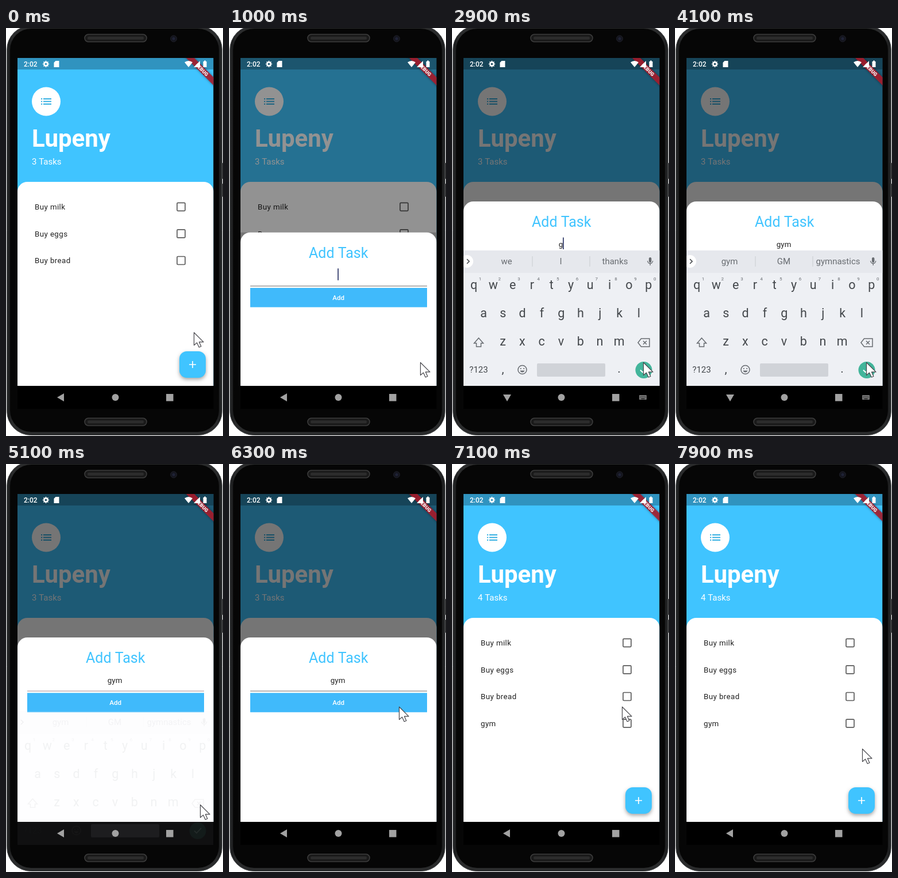
An HTML page with a canvas for the animation above (8 s loop, 378x708 px).

```html
<!DOCTYPE html>
<html lang="en">
<head>
<meta charset="utf-8">
<title>Adding a task</title>
<style>
html, body { margin: 0; width: 100%; height: 100%; overflow: hidden; background: #fff; }
canvas { display: block; width: 378px; height: 708px; }
</style>
</head>
<body>
<canvas></canvas>
<script>
const LOOP = 8000, STEP = 100;
const BLUE = '#40c4ff', MID = 190.7;
const canvas = document.querySelector('canvas');
const c = canvas.getContext('2d');
const ratio = window.devicePixelRatio || 1;
canvas.width = 378 * ratio;
canvas.height = 708 * ratio;

const clamp = v => Math.max(0, Math.min(1, v));
const span = (t, from, to) => clamp((t - from) / (to - from));

function bezier(x1, y1, x2, y2) {
  const at = (a, b, u) => 3 * a * u * (1 - u) ** 2 + 3 * b * u * u * (1 - u) + u ** 3;
  return x => {
    let lo = 0, hi = 1;
    for (let i = 0; i < 24; i++) {
      const m = (lo + hi) / 2;
      if (at(x1, x2, m) < x) lo = m; else hi = m;
    }
    return at(y1, y2, lo);
  };
}
const ease = bezier(.25, .1, .25, 1);
const sheetCurve = bezier(0, 0, .2, 1);

function box(x, y, w, h, r, fill, stroke, width = 1) {
  c.beginPath();
  c.roundRect(x, y, w, h, r);
  paint(fill, stroke, width);
}
function disc(x, y, r, fill, stroke, width = 1) {
  c.beginPath();
  c.arc(x, y, r, 0, 7);
  paint(fill, stroke, width);
}
function shape(d, x, y, fill, stroke, width = 1) {
  c.save();
  c.translate(x, y);
  const p = new Path2D(d);
  if (fill) { c.fillStyle = fill; c.fill(p); }
  if (stroke) { c.strokeStyle = stroke; c.lineWidth = width; c.stroke(p); }
  c.restore();
}
function paint(fill, stroke, width) {
  if (fill) { c.fillStyle = fill; c.fill(); }
  if (stroke) { c.strokeStyle = stroke; c.lineWidth = width; c.stroke(); }
}
function text(s, x, y, size, color, { weight = 400, align = 'center', spacing = 0 } = {}) {
  c.font = `${weight} ${size}px Roboto, sans-serif`;
  c.letterSpacing = spacing + 'px';
  c.textAlign = align;
  c.fillStyle = color;
  c.fillText(s, x, y);
}

function phone() {
  const rim = c.createLinearGradient(0, 0, 378, 0);
  [[0, '#55585a'], [.012, '#1b1c1d'], [.03, '#2a2b2c'], [.97, '#2a2b2c'], [.988, '#1b1c1d'], [1, '#55585a']]
    .forEach(s => rim.addColorStop(...s));
  box(375, 234, 3, 28, 1, '#333');
  box(375, 270, 3, 23, 1, '#333');
  box(1.5, -4, 375, 710.5, 42, rim, '#3c3e40');
  box(7, 1, 364, 700, 37, '#060606');
  for (const y of [11, 677]) {
    box(137, y, 108, 13, 6.5, '#1a1a1a', '#3d3d3d', 1.5);
    box(142, y + 4, 98, 5, 2.5, '#2c2c2c');
  }
  disc(292, 18.5, 5.5, '#14151d', '#1f2029');
  disc(292, 18.5, 2.5, '#1f2236');
}

function home(t) {
  const left = { align: 'left' };
  c.fillStyle = BLUE;
  c.fillRect(20, 52, 341.5, 569);
  disc(70, 127.5, 25, '#fff');
  for (const y of [123, 127.5, 132]) {
    box(61, y - 1, 2.2, 2, 0, '#35b0e2');
    box(65, y - 1, 14, 2, 0, '#35b0e2');
  }
  text('Lupeny', 45, 205.5, 42, '#fff', { align: 'left', weight: 700 });
  text(t < 7000 ? '3 Tasks' : '4 Tasks', 45, 237, 15, '#fff', left);

  box(20, 267, 341.5, 354, [17, 17, 0, 0], '#fff');
  const tasks = ['Buy milk', 'Buy eggs', 'Buy bread'];
  if (t >= 7000) tasks.push('gym');
  tasks.forEach((name, i) => {
    const y = 310.3 + i * 46.6;
    text(name, 50, y + 4.7, 13.3, '#222', { align: 'left', spacing: .42 });
    box(298, y - 7, 14, 14, 1.5, null, '#5c5c5c', 1.7);
  });

  c.save();
  c.shadowColor = 'rgba(0,0,0,.35)';
  c.shadowBlur = 6 * ratio;
  c.shadowOffsetY = 3 * ratio;
  box(302, 561, 46, 46, 13, BLUE);
  c.restore();
  if (t >= 700 && t < 1000) box(302, 561, 46, 46, 13, `rgba(255,255,255,${t < 800 ? .15 : .25})`);
  shape('M-6 0H6M0-6V6', 325, 584, null, '#fff', 1.7);
}

function typed(t) {
  return t < 2900 ? '' : t < 3200 ? 'g' : t < 3400 ? 'gy' : 'gym';
}
function caretOn(t) {
  if (t < 1000 || t >= 5000) return false;
  const since = [3400, 3200, 2900, 1000].find(s => t >= s);
  return Math.floor((t - since) / 500) % 2 === 0;
}

function sheet(t, open) {
  const top = 621 - 320 * sheetCurve(open);
  c.save();
  c.translate(0, top);
  c.fillStyle = '#757575';
  c.fillRect(20, 0, 341.5, 320);
  box(20, 0, 341.5, 330, [17, 17, 0, 0], '#fff');
  text('Add Task', MID, 44, 25, BLUE);

  const word = typed(t);
  text(word, MID - 1, 79, 13.3, '#222', { spacing: .2 });
  if (caretOn(t)) box(MID - 1.5 + c.measureText(word).width / 2, 62.5, 1.7, 20.5, 0, '#2c3566');

  const [line, thick] = t < 1200 ? ['#b0b0b0', 2] : t < 5100 ? ['#4b3588', 2]
    : t < 5200 ? ['#a08a92', 1.2] : ['#6c6c6c', 1];
  box(37, 93 - thick / 2, 308, thick, 0, line);
  box(37, 96.3, 308, 33.5, 0, t < 7000 ? '#40bafb' : '#42aeef');
  text('Add', MID, 117, 11.6, '#fff', { weight: 500 });
  c.restore();
}

function suggestions(t) {
  return t < 3000 ? ['we', 'I', 'thanks'] : t < 3200 ? ['good', 'go', 'get']
    : t < 3500 ? ['gym', 'guy', 'gyms'] : ['gym', 'GM', 'gymnastics'];
}

function keyboard(t) {
  const rising = span(t, 1560, 1800);
  const leaving = span(t, 5000, 5107);
  if (!rising || leaving === 1) return;
  const ink = '#43474b', soft = '#686c71', pitch = 33.8;
  c.save();
  c.beginPath();
  c.rect(20, 52, 341.5, 609);
  c.clip();
  c.globalAlpha = Math.min(1, rising * 1.28) * (1 - leaving);
  c.translate(0, 53 * (1 - rising) + 46 * leaving);
  box(20, 386, 341.5, 235, 0, '#eef0f4');
  box(20, 386, 341.5, 39, 0, '#e6e8ed');

  disc(26, 405, 11, '#fff');
  shape('M-2-4L2 0L-2 4', 28, 405, null, ink, 1.6);
  suggestions(t).forEach((s, i) => text(s, 95 + 94.5 * i, 410, 15, soft));
  for (const x of [140, 240]) box(x - .5, 396, 1, 18, 0, '#c8cbd0');
  box(343, 398, 4.4, 9, 2.2, soft);
  shape('M-4.5-1A4.5 4.5 0 0 0 4.5-1M0 3.5V7', 345.2, 405, null, soft, 1.3);

  [['qwertyuiop', 38, 453], ['asdfghjkl', 55, 502], ['zxcvbnm', 88.5, 551]].forEach(([keys, x, y]) =>
    [...keys].forEach((key, i) => text(key, x + pitch * i, y, 21.5, ink)));
  [...'1234567890'].forEach((n, i) => text(n, 49 + pitch * i, 438, 8, soft));

  shape('M0-8L8 1H4V7H-4V1H-8Z', 46.5, 546, null, soft, 1.5);
  shape('M-10 0L-4.5-7H10V7H-4.5ZM-1-3L5 3M5-3L-1 3', 334, 546, null, soft, 1.5);
  text('?123', 46.5, 598, 15, ink);
  text(',', 88.5, 599, 21, ink);
  disc(122.5, 593, 7.5, null, soft, 1.5);
  shape('M-4 1.5A4.2 4.2 0 0 0 4 1.5Z', 122.5, 593, soft);
  disc(119.8, 591, 1.1, soft);
  disc(125.2, 591, 1.1, soft);
  box(148, 582, 119, 23, 2, '#d0d3d8');
  text('.', 291, 598, 21, ink);
  disc(334, 593.5, 14.5, t >= 4700 && t < 4900 ? '#2f937c' : '#43b59b');
  shape('M-6 0L-2 4L6-4.5', 334, 593.5, null, '#fff', 1.8);
  c.restore();
}

function navigation(t) {
  const grey = '#a2a2a2', typing = t >= 1600 && t < 5100;
  shape(typing ? 'M-7-5H7L0 7Z' : 'M-7 0L5-7V7Z', 96, 641, grey);
  disc(190.5, 641, 6, grey);
  box(279, 635, 12.5, 12.5, 0, grey);
  if (typing) {
    box(326, 637, 13, 8, 1, '#777');
    for (let i = 0; i < 10; i++) box(327.5 + i % 5 * 2.2, 639 + (i > 4) * 2.2, 1, 1, 0, '#111');
    box(329.5, 643, 6, 1, 0, '#111');
  }
}

function banner() {
  c.save();
  c.beginPath();
  c.rect(20, 52, 341.5, 569);
  c.clip();
  c.translate(341.3, 72.3);
  c.rotate(Math.PI / 4);
  c.shadowColor = 'rgba(0,0,0,.5)';
  c.shadowBlur = 4 * ratio;
  box(-50, -5, 100, 10, 0, 'rgba(176,28,44,.85)');
  c.shadowColor = 'transparent';
  text('DEBUG', 0, 3, 8.5, '#fff', { weight: 900 });
  c.restore();
}

function statusBar() {
  text('2:02', 31, 67, 12, '#fff', { align: 'left', weight: 500 });
  disc(69.5, 62.5, 3, null, '#fff', 2.4);
  for (let i = 0; i < 8; i++) {
    const a = i * Math.PI / 4;
    disc(69.5 + 4.6 * Math.cos(a), 62.5 + 4.6 * Math.sin(a), 1.1, '#fff');
  }
  shape('M-1.5-5.5H4.5V5.5H-4.5V-2.5Z', 88, 62.5, '#fff');
  shape('M0 5.5L-7-3Q0-8 7-3Z', 318, 62.5, '#fff');
  shape('M5-5.5V5.5H-6Z', 333, 62.5, '#fff');
  shape('M-3-4.5H-1.3V-6H1.3V-4.5H3V5.5H-3Z', 346.5, 62.5, '#fff');
}

const pointerStops = [
  [0, 327, 528], [300, 333, 580], [4100, 333, 580], [4500, 338, 591],
  [5800, 338, 591], [6300, 296, 421], [7200, 296, 421], [7800, 326, 508], [7900, 326, 494]
];
function pointer(t) {
  const next = pointerStops.findIndex(s => s[0] > t);
  const b = pointerStops.at(next), a = next > 0 ? pointerStops[next - 1] : b;
  const k = b === a ? 0 : span(t, a[0], b[0]), s = k * k * (3 - 2 * k);
  c.lineJoin = 'round';
  shape('M0 0V22L5 17.6L8.7 25.5L12.4 24L9 16.4H16.5Z',
    a[1] + (b[1] - a[1]) * s + .5, a[2] + (b[2] - a[2]) * s + .5, '#fff', '#45454a', 1.2);
  c.lineJoin = 'miter';
}

function draw(t) {
  c.setTransform(ratio, 0, 0, ratio, 0, 0);
  c.fillStyle = '#fff';
  c.fillRect(0, 0, 378, 708);
  phone();
  box(20, 621, 341.5, 40, 0, '#000');

  c.save();
  c.beginPath();
  c.rect(20, 52, 341.5, 569);
  c.clip();
  home(t);
  const open = span(t, 901, 1103) * (1 - span(t, 6901, 7025));
  if (open) {
    box(20, 52, 341.5, 569, 0, `rgba(0,0,0,${.54 * ease(open)})`);
    sheet(t, open);
  }
  box(20, 52, 341.5, 20, 0, 'rgba(0,0,0,.25)');
  c.restore();

  banner();
  statusBar();
  keyboard(t);
  navigation(t);
  pointer(t);
}

const start = performance.now();
function tick() {
  const t = (performance.now() - start) % LOOP;
  draw(Math.floor(t / STEP) * STEP);
  requestAnimationFrame(tick);
}
tick();
</script>
</body>
</html>
```
